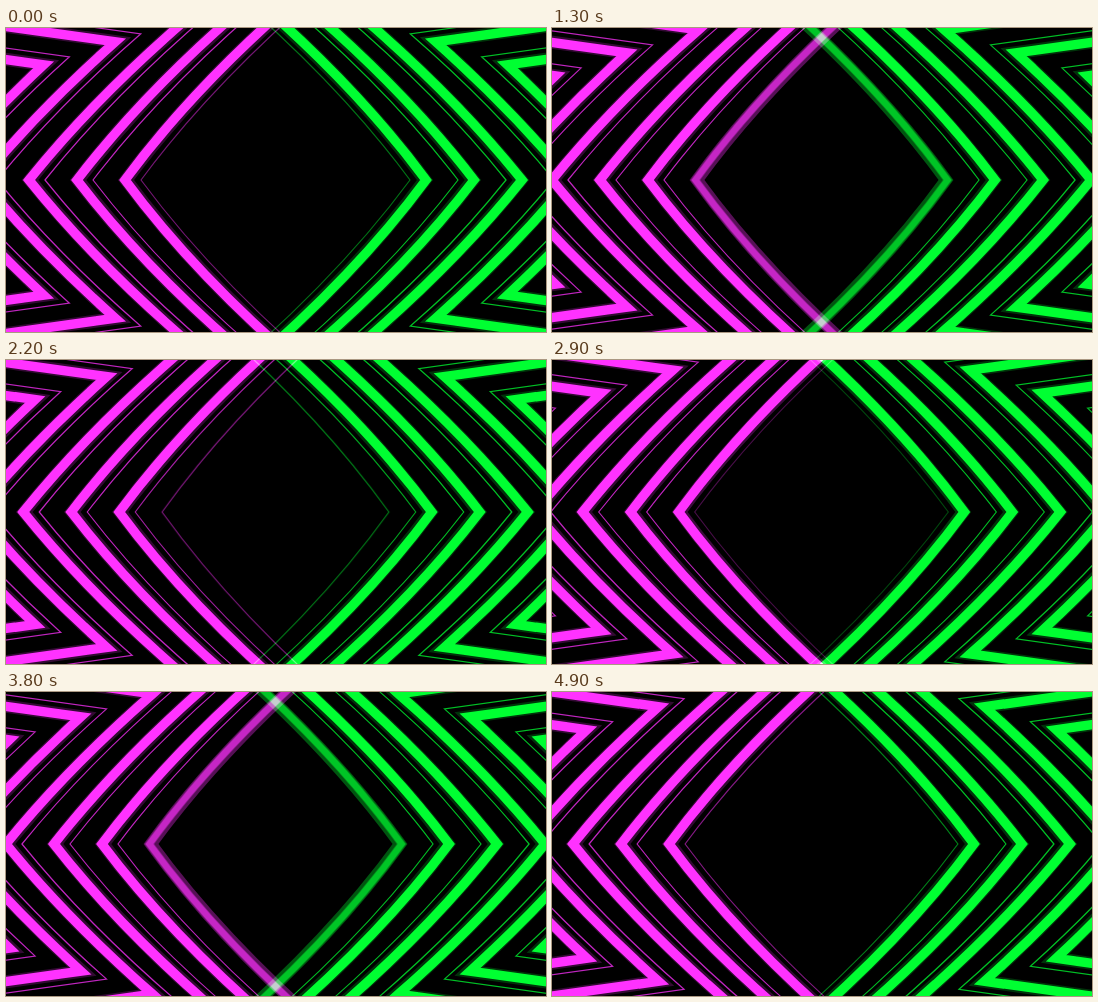
Recreate the animation shown at these times as an HTML page without scripts. Size 540 px wide and 304 px high, loop 5000 ms.

```html
<!DOCTYPE html>
<html lang="en">
<head>
<meta charset="utf-8">
<title>Neon chevrons</title>
<style>
html, body { margin: 0; width: 100%; height: 100%; overflow: hidden; background: #000; }
svg { display: block; width: 100vw; height: 100vh; background: #000; isolation: isolate; }

.side { mix-blend-mode: screen; }
.pink { color: #ff32ff; }
.lime { color: #00ff32; }

path {
  fill: none;
  stroke: currentColor;
  stroke-miterlimit: 6;
  animation: 15s infinite;
  animation-delay: calc(var(--k) * -2.5s);
}

/* each chevron travels six spacings, one every 2.5s, in 100ms ticks */
.core { stroke-width: 9.4; animation-name: travel, core-fade; }
.halo { stroke-width: 13; opacity: .2; animation-name: travel, halo-fade; }
.line { stroke-width: 1.2; opacity: .75; animation-name: travel-line, line-fade; }

@keyframes travel {
  0% { d: path("M-533 -10L-33 59.8Q-79 105.9 -120 152Q-79 198.1 -33 244.2L-533 314"); animation-timing-function: steps(75); }
  50% { d: path("M-318 -79L182 -9.2Q88.7 71.4 24 152Q88.7 232.6 182 313.2L-318 383"); animation-timing-function: steps(75); }
  100% { d: path("M-109 -148L391.2 -78.2Q250.4 36.9 168 152Q250.4 267.1 391.2 382.2L-109 452"); }
}
@keyframes travel-line {
  0% { d: path("M-507 -18L-7 51.8Q-60 101.9 -104 152Q-60 202.1 -7 252.2L-507 322"); animation-timing-function: steps(75); }
  50% { d: path("M-293 -87L207.3 -17.2Q107.9 67.4 40 152Q107.9 236.6 207.3 321.2L-293 391"); animation-timing-function: steps(75); }
  100% { d: path("M-83 -156L417 -86.2Q269.3 32.9 184 152Q269.3 271.1 417 390.2L-83 460"); }
}

/* fading happens in the last spacing before the centre */
@keyframes core-fade {
  0%, 86.667% { stroke-width: 9.4; opacity: 1; transform: none; animation-timing-function: steps(8); }
  92% { stroke-width: 7; opacity: .66; transform: translateX(-.5px); animation-timing-function: steps(9); }
  98% { stroke-width: 1.2; opacity: .5; transform: translateX(-5.2px); animation-timing-function: steps(1); }
  98.667%, 100% { stroke-width: 1; opacity: 0; transform: translateX(-5.2px); }
}
@keyframes halo-fade {
  0%, 83.333% { stroke-width: 13; opacity: .2; transform: translateX(1px); animation-timing-function: steps(13); }
  92% { stroke-width: 12; opacity: .34; transform: translateX(1px); animation-timing-function: steps(9); }
  98%, 100% { stroke-width: 3; opacity: 0; transform: translateX(-5px); }
}
@keyframes line-fade {
  0%, 80% { opacity: .75; animation-timing-function: steps(5); }
  83.333% { opacity: .45; animation-timing-function: steps(5); }
  86.667% { opacity: .24; animation-timing-function: steps(8); }
  92%, 100% { opacity: 0; }
}
</style>
</head>
<body>
<svg viewBox="0 0 540 304" preserveAspectRatio="none">
  <g class="side pink" transform="translate(-1)">
    <g style="--k:0"><path class="halo"/><path class="core"/><path class="line"/></g>
    <g style="--k:1"><path class="halo"/><path class="core"/><path class="line"/></g>
    <g style="--k:2"><path class="halo"/><path class="core"/><path class="line"/></g>
    <g style="--k:3"><path class="halo"/><path class="core"/><path class="line"/></g>
    <g style="--k:4"><path class="halo"/><path class="core"/><path class="line"/></g>
    <g style="--k:5"><path class="halo"/><path class="core"/><path class="line"/></g>
  </g>
  <g class="side lime" transform="matrix(-1 0 0 1 540 0)">
    <g style="--k:0"><path class="halo"/><path class="core"/><path class="line"/></g>
    <g style="--k:1"><path class="halo"/><path class="core"/><path class="line"/></g>
    <g style="--k:2"><path class="halo"/><path class="core"/><path class="line"/></g>
    <g style="--k:3"><path class="halo"/><path class="core"/><path class="line"/></g>
    <g style="--k:4"><path class="halo"/><path class="core"/><path class="line"/></g>
    <g style="--k:5"><path class="halo"/><path class="core"/><path class="line"/></g>
  </g>
</svg>
</body>
</html>
```
